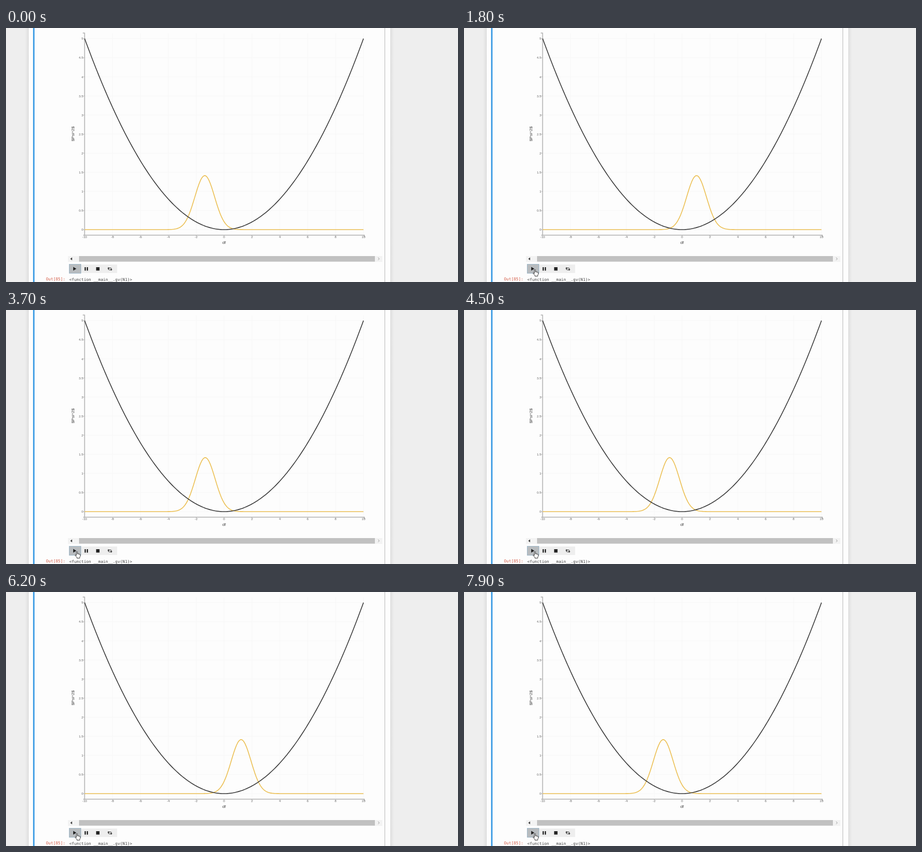
Animation, 854 px wide and 480 px high, one loop 8 s. Source, as an HTML page:

```html
<!DOCTYPE html>
<html lang="en">
<head>
<meta charset="utf-8">
<title>Wave packet in a harmonic well</title>
<style>
  html, body { margin: 0; width: 100%; height: 100%; overflow: hidden; background: #eee; }
  svg { display: block; width: 854px; height: 480px; }
  text { font-family: "Liberation Sans", Arial, sans-serif; fill: #666; }
  .tick { font-size: 6.2px; }
  .label { font-size: 8px; fill: #444; }
  .mono { font: 7.6px "DejaVu Sans Mono", monospace; fill: #444; }
  .curve { fill: none; stroke-width: 1.6; stroke-linejoin: round; }
  .axis { fill: none; stroke: #b0b0b0; stroke-width: 1.5; }
</style>
</head>
<body>
<svg viewBox="0 0 854 480">
  <defs>
    <linearGradient id="edge">
      <stop offset="0" stop-color="#dedede"/>
      <stop offset="1" stop-color="#eee"/>
    </linearGradient>
  </defs>

  <!-- notebook page and selected cell -->
  <rect width="854" height="480" fill="#eee"/>
  <rect x="726" width="7" height="480" fill="url(#edge)"/>
  <rect x="36" width="7" height="480" fill="url(#edge)" transform="matrix(-1 0 0 1 79 0)"/>
  <rect x="43" width="683" height="480" fill="#fdfdfd"/>
  <rect x="51" width="3" height="480" fill="#4ba3e6"/>
  <rect x="715" width="1.3" height="480" fill="#c8c8c8"/>

  <!-- plot -->
  <g id="grid" stroke="#f7f7f7"></g>
  <path class="axis" d="M145 9.5H148.5V391.5M146 391.5H677V395"/>
  <g id="ticks"></g>
  <text class="label" x="412" y="408" text-anchor="middle">df</text>
  <text class="label" text-anchor="middle" transform="translate(129 200) rotate(-90)">$Psi^2$</text>
  <path id="packet" class="curve" stroke="#ecc055"/>
  <path id="well" class="curve" stroke="#3c3c3c"/>

  <!-- scrollbar -->
  <rect x="117" y="431" width="594" height="11" fill="#f3f3f3"/>
  <rect x="138" y="431" width="559" height="10.5" fill="#c1c1c1"/>
  <path d="M125 433.5V439L121.3 436.2Z" fill="#444"/>
  <path d="M703 433.8L705.3 436.2L703 438.6" fill="none" stroke="#999"/>

  <!-- player buttons -->
  <rect x="119" y="447" width="91" height="16" fill="#eee"/>
  <rect x="119.5" y="446.5" width="22" height="17" fill="#b8bcbf" stroke="#9fb8c9"/>
  <g fill="#222">
    <path d="M127 451.5L133 455L127 458.5Z"/>
    <path d="M148.5 452h2.3v6.5h-2.3zM152.6 452h2.3v6.5h-2.3z"/>
    <rect x="170.3" y="452" width="6.4" height="6.4"/>
    <path d="M193.5 457V453.5H198M199 453.5V457H194.5" fill="none" stroke="#222" stroke-width="1.1"/>
    <path d="M191.7 454.5L193.5 452L195.3 454.5ZM197.2 456L199 458.5L200.8 456Z"/>
  </g>

  <text class="mono" x="75.5" y="477" style="fill:#d45a45">Out[85]:</text>
  <text class="mono" x="119.5" y="478">&lt;function __main__.gv(N1)&gt;</text>

  <path id="hand" transform="translate(130 456)" fill="#fff" stroke="#333" stroke-width="1"
    d="M3 8V1.6Q3 .5 4 .5T5 1.6V5Q6 4.2 7 5.2Q8 4.6 8.8 5.7Q10.3 5.2 10.3 7V9.5L9.2 11.5V13H4V11.5L.8 8Q.4 6.5 1.6 6.8Z"/>
</svg>

<script>
const LOOP = 8000, STEP = 100, HAND_AT = 500;
const AMPLITUDE = Math.SQRT2;
// [time, oscillation phase]: playback speed drifts slightly
const PHASES = [[0, -0.2], [1100, 1.22], [2600, 3.74], [3700, 5.98],
                [4500, 7.17], [6200, 9.95], [7900, 12.87]];

const $ = id => document.getElementById(id);
const px = x => 412 + x * 26.34;
const py = y => 381 - y * 72.2;

function add(parent, name, attrs, text = '') {
  const el = document.createElementNS('http://www.w3.org/2000/svg', name);
  for (const key in attrs) el.setAttribute(key, attrs[key]);
  el.textContent = text;
  $(parent).append(el);
}

function plot(fn) {
  let d = '';
  for (let x = -10; x <= 10.001; x += 0.1)
    d += (d ? 'L' : 'M') + px(x).toFixed(2) + ' ' + py(fn(x)).toFixed(2);
  return d;
}

for (let y = 0; y <= 5; y += 0.5) {
  add('grid', 'path', { d: `M149 ${py(y)}H676` });
  add('ticks', 'path', { d: `M146 ${py(y)}H148`, stroke: '#bbb' });
  add('ticks', 'text', { class: 'tick', x: 146, y: py(y) + 2.3, 'text-anchor': 'end' }, y);
}
for (let x = -10; x <= 10; x += 2) {
  add('grid', 'path', { d: `M${px(x)} 10V391` });
  add('ticks', 'path', { d: `M${px(x)} 391V393.5`, stroke: '#bbb' });
  add('ticks', 'text', { class: 'tick', x: px(x), y: 397.3, 'text-anchor': 'middle' }, x);
}
$('well').setAttribute('d', plot(x => 0.05 * x * x));

function phaseAt(t) {
  const i = Math.max(1, PHASES.findIndex(([end]) => t <= end));
  const [t0, p0] = PHASES[i - 1], [t1, p1] = PHASES[i];
  return p0 + (p1 - p0) * (t - t0) / (t1 - t0);
}

function draw(now) {
  const t = Math.floor(now % LOOP / STEP) * STEP;
  const center = -AMPLITUDE * Math.cos(phaseAt(t));
  $('packet').setAttribute('d', plot(x => 1.415 * Math.exp(-((x - center) ** 2))));
  $('hand').style.display = t < HAND_AT ? 'none' : '';
}

const start = performance.now();
function frame() {
  draw(performance.now() - start);
  requestAnimationFrame(frame);
}
frame();
</script>
</body>
</html>
```
